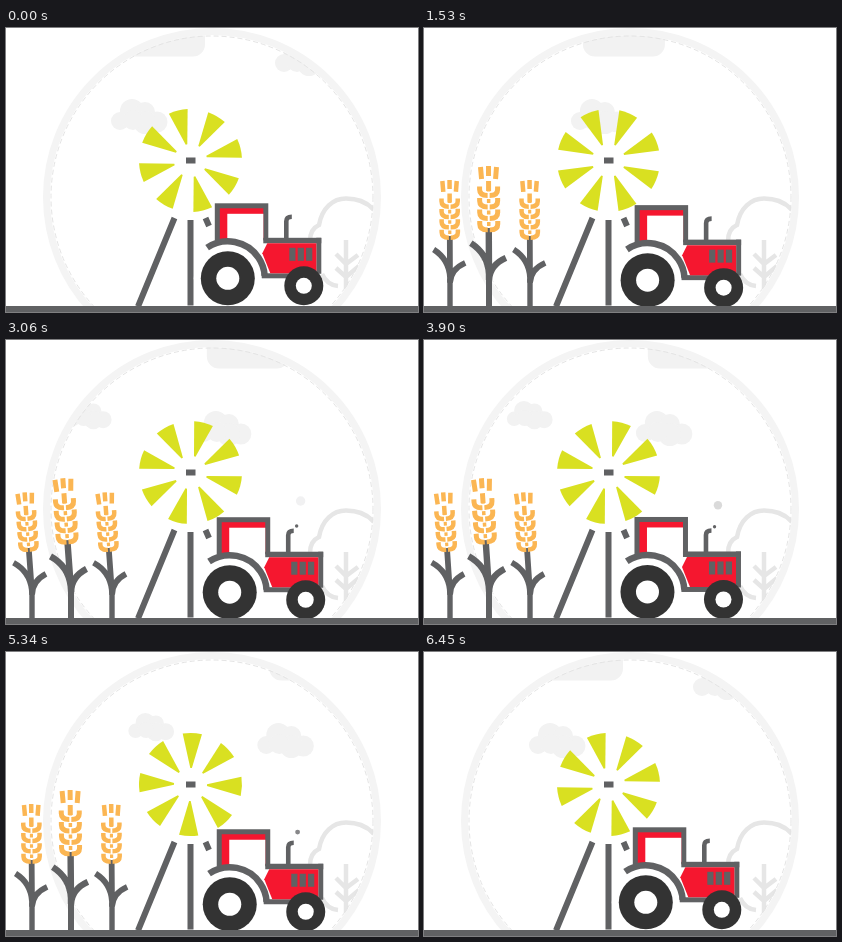
Animation, 412 px wide and 284 px high, one loop 6.48 s. Source, as an HTML page with a canvas:

```html
<!DOCTYPE html>
<html lang="en">
<head>
<meta charset="utf-8">
<title>Farm scene</title>
<style>
html, body { margin: 0; width: 100%; height: 100%; overflow: hidden; background: #fff; }
canvas { display: block; width: 412px; height: 284px; }
</style>
</head>
<body>
<canvas id="stage"></canvas>
<script>
const W = 412, H = 284, LOOP = 6480, STEP = 30, TAU = Math.PI * 2;
const GREY = '#606163', RED = '#f5172f', CORN = '#fbb653', LIME = '#d9e021', TYRE = '#333', HAZE = '#f2f2f2';
const canvas = document.getElementById('stage');
const dpr = window.devicePixelRatio || 1;
canvas.width = W * dpr;
canvas.height = H * dpr;
const c = canvas.getContext('2d');

const clamp = x => Math.max(0, Math.min(1, x));
const easeOut = x => 1 - (1 - clamp(x)) ** 2;
const rad = deg => deg * Math.PI / 180;

function rect(x, y, w, h, color) {
  c.fillStyle = color;
  c.fillRect(x, y, w, h);
}
function disc(x, y, r, color) {
  c.fillStyle = color;
  c.beginPath();
  c.arc(x, y, r, 0, TAU);
  c.fill();
}
function fill(d, color) {
  c.fillStyle = color;
  c.fill(new Path2D(d));
}
function stroke(d, color, width) {
  c.strokeStyle = color;
  c.lineWidth = width;
  c.stroke(new Path2D(d));
}
function arc(x, y, r, from, to, color, width) {
  c.strokeStyle = color;
  c.lineWidth = width;
  c.beginPath();
  c.arc(x, y, r, rad(from), rad(to));
  c.stroke();
}
function at(x, y, draw) {
  c.save();
  c.translate(x, y);
  draw();
  c.restore();
}

const lobes = [[9, 22, 9], [21, 12, 12], [34, 13, 10], [46, 23, 10.5], [34, 23.5, 11.5], [22, 21, 10]];
function cloud(x, y, s) {
  for (const [lx, ly, r] of lobes) disc(x + lx * s, y + ly * s, r * s, HAZE);
}

function backdrop(t) {
  const drift = t * 0.0274;
  c.save();
  c.beginPath();
  c.arc(206, 169, 162, 0, TAU);
  c.clip();
  c.fillStyle = HAZE;
  c.beginPath();
  c.roundRect(117 + drift, -6, 82, 34.5, 12);
  c.fill();
  cloud(105 + drift, 71, 1);
  cloud(269 + drift, 13, 1);
  cloud(-24 + drift, 61, 0.81);
  tree();
  c.restore();
  arc(206, 169, 165.5, 0, 360, '#f4f4f4', 7);
  c.setLineDash([5, 3]);
  arc(206, 169, 161, 0, 360, '#e4e4e4', 1);
  c.setLineDash([]);
}

function tree() {
  stroke('M304 213Q304 201 313 197C316 180 327 170.5 340 170.5C352 170.5 361 174 368 182', '#e6e6e6', 4.5);
  stroke('M340 212V261M330 226L340 236L352 227M330 240L340 249L353 238M316 246Q321 257 332 258', '#e6e6e6', 4.5);
}

function windmill(t) {
  stroke('M168.5 190L132 278.5M184.5 192V277.5M199.5 190L203 198', GREY, 6);
  at(184.5, 132.5, () => {
    c.rotate(rad(31 + t * 90 / 1680));
    c.fillStyle = LIME;
    for (let i = 0; i < 8; i++) {
      c.rotate(TAU / 8);
      c.beginPath();
      c.arc(0, 0, 51.5, -rad(10.8), rad(10.8));
      c.lineTo(16.5, 0.8);
      c.lineTo(16.5, -0.8);
      c.fill();
    }
  });
  rect(180, 129.5, 9.5, 6, GREY);
}

function ear() {
  stroke('M0 -141V-131M0 -126V-116M-8 -140L-7 -128M8 -140L7 -128', CORN, 5);
  for (let i = 0; i < 4; i++) {
    const y = -77 - i * 11.5;
    for (const s of [-1, 1]) {
      stroke(`M${9 * s} ${y - 9}v3q0 6 ${-8 * s} 6`, CORN, 5);
    }
    stroke(`M0 ${y - 4}v-4`, CORN, 3.5);
  }
}

function plant(x, scale, start, t) {
  if (t === 0) return;
  const ramp = clamp((t - 1200) / 800);
  const tilt = ramp * (-2.2 + 3 * Math.cos(TAU * (t - 2000) / 2900));
  at(x, 279, () => {
    c.scale(scale, scale * easeOut((t - 20) / 500));
    stroke('M0 0V-31', GREY, 6);
    // only the part above the lowest leaf sways
    c.translate(0, -29);
    c.rotate(rad(tilt));
    c.translate(0, 29);
    stroke('M0 -27V-79M0 -33Q-1 -53 -18 -64M0 -27Q1 -42 17 -49', GREY, 6.4);
    // the ear rises out of the stem
    c.beginPath();
    c.rect(-15, -150, 30, 75.5);
    c.clip();
    c.translate(0, 68 * (1 - easeOut((t - start) / 900)));
    ear();
  });
}

function wheel(x, y, r, hub) {
  disc(x, y, r, TYRE);
  disc(x, y, hub, '#fff');
}

function tractor(t) {
  const shift = t ? -1.7 * (1 - easeOut(t / 600)) + 0.25 * Math.sin(t / 40) : -1.7;
  at(shift, shift, () => {
    stroke('M282 213V195Q282 190.5 287.5 190.5', GREY, 4.6);
    rect(210.5, 177, 53.5, 37, GREY);
    rect(215.5, 182, 43.5, 32, RED);
    rect(223, 187.5, 36, 28, '#fff');
    rect(259, 211.5, 58, 5.5, GREY);
    rect(312, 211.5, 5, 36, GREY);
    rect(256, 247, 30, 5, GREY);
    fill('M263 217H312V247H266L258 227Z', RED);
    for (let i = 0; i < 3; i++) rect(285 + i * 8.4, 221.5, 6.2, 13, GREY);
    disc(223.5, 252, 34, '#fff');
    arc(223.5, 252, 37, -124, -4, GREY, 6.5);
    wheel(223.5, 252, 27, 11.5);
    wheel(299.5, 259.5, 19.5, 8);
  });
}

function smoke(t) {
  for (const start of [2010, 3020, 3890, 4180, 5060]) {
    const p = (t - start) / 1150;
    if (p <= 0 || p >= 1) continue;
    c.globalAlpha = 1 - p;
    disc(290.5 + p * 4.5, 187 - p * 28.5, 1.6 + 3.4 * p, GREY);
  }
  c.globalAlpha = 1;
}

function draw(now) {
  let t = Math.floor(now % LOOP / STEP) * STEP;
  if (t >= LOOP - STEP) t = 0; // the loop closes on its opening pose
  c.setTransform(dpr, 0, 0, dpr, 0, 0);
  rect(0, 0, W, H, '#fff');
  backdrop(t);
  windmill(t);
  plant(26, 0.9, 480, t);
  plant(65, 1, 430, t);
  plant(106, 0.9, 480, t);
  tractor(t);
  smoke(t);
  rect(0, 278, W, 6, GREY);
}

const begin = performance.now();
function loop() {
  draw(performance.now() - begin);
  requestAnimationFrame(loop);
}
loop();
</script>
</body>
</html>
```
